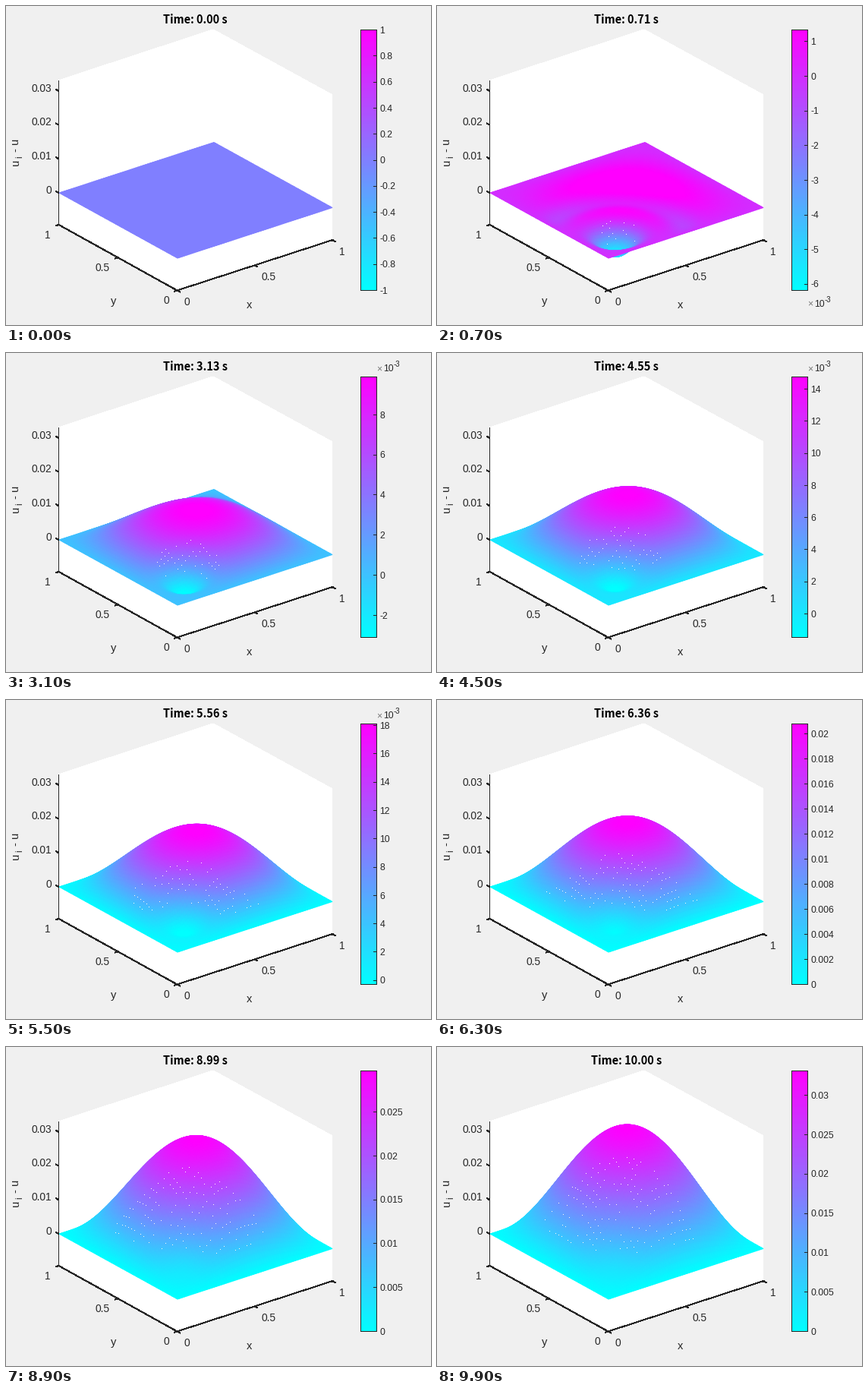
A matplotlib script that plays this animation: 560x420 px, repeating every 10000 ms.

```python
import numpy as np
import matplotlib
import matplotlib.pyplot as plt
from matplotlib.animation import FuncAnimation

W, H, DPI = 560, 420, 100
FRAMES, T_END = 100, 10.0
INK = "#262626"
Z_PX = 4.47                      # pixels per 1e-3 of height
BAR = (467, 488, 31, 374)        # border pixels: left, right, top, bottom

matplotlib.rcParams["font.family"] = "Liberation Sans"

fig = plt.figure(figsize=(W / DPI, H / DPI), dpi=DPI, facecolor="#f0f0f0")
ax = fig.add_axes([0, 0, 1, 1])
ax.axis("off")


def project(x, y, z=0.0):
    """Unit square plus height (in 1e-3) to stage pixels."""
    return 226 + 204 * x - 156 * y, 332 - 66.5 * x - 86 * y - Z_PX * z


def label(x, y, text, px=13.8, **kw):
    kw = {"color": INK, "va": "baseline", "zorder": 6, **kw}
    return ax.text(x, y, text, fontsize=px * 72 / DPI, **kw)


def line(xs, ys):
    # Upright and level lines snap to whole pixels, slanted ones do not.
    return ax.plot(xs, ys, color=INK, lw=0.72, zorder=4, antialiased=False,
                   solid_capstyle="butt")[0]


def grid(n):
    # Ordered from the far corner to the near one, so near cells paint last.
    s = np.linspace(1, 0, n)
    return np.meshgrid(s, s)


def limits(t):
    if t == 0:
        return -1000.0, 1000.0
    lo = np.interp(t, [0, 0.2, 0.4, 0.707, 1.818, 4.545, 5.8],
                   [0, -6, -9.4, -6.18, -4.62, -1.47, 0])
    hi = np.interp(t, [0, 0.707, 1.818, 4.545, 6.364, 7.879, 10],
                   [0, 1.335, 5.36, 14.76, 20.8, 25.94, 33.1])
    return lo, hi


def height(x, y, t):
    """Growing dome, a dip near the front corner and an outgoing ring."""
    if t == 0:
        return np.zeros_like(x)
    base = np.sin(np.pi * x) * np.sin(np.pi * y)
    dome = 3.35 * t - 0.45 * (1 - np.exp(-t))
    # The dome settles with fuller shoulders, leaning to the far corner.
    lean = (1 - np.exp(-(t / 2.5) ** 2)) * (2 * (1 - base) + 3 * (x + y - 1))
    dip = np.interp(t, [0, 0.2, 0.4, 0.707, 1.818, 4.545, 10],
                    [0, 6.1, 9.7, 6.95, 6.6, 6.5, 4.8])
    ring = 1.5 / np.sqrt(max(t, 0.5)) * min(t / 0.6, 1) * np.exp(-t / 4)
    r = np.hypot(x - 0.2, y - 0.2)
    edge = np.tanh(12 * x * (1 - x)) * np.tanh(12 * y * (1 - y)) / 0.918
    wave = (dip * np.exp(-r**2 / (2 * 0.09**2))
            + ring * np.exp(-((r - 0.52 * t) / 0.1) ** 2))
    return (dome + lean) * base - edge * wave


def nice_step(span):
    base = 10.0 ** np.floor(np.log10(span / 11))
    return next(m * base for m in (1, 2, 5, 10) if span / (m * base) <= 11)


def build_axes():
    ax.fill([69, 273, 430, 430, 225.5, 69], [98, 31, 117, 308, 374.5, 288],
            color="white", lw=0, antialiased=False, zorder=1)
    line([69, 69], [98, 288])
    line([69.5, 225.5], [288, 374.5])
    line([225.5, 430.5], [374.5, 308])
    for k, text in enumerate(["0", "0.01", "0.02", "0.03"]):
        y = 246 - 10 * Z_PX * k
        line([65.5, 69.5], [y - 2.2, y])
        label(60.5, y + 0.7, text, ha="right")
    for v, text in ((0, "0"), (0.5, "0.5"), (1, "1")):
        x, y = 225.5 - 156 * v, 374.5 - 86.5 * v
        line([x - 4, x], [y + 1.4, y])
        label(x - 10.5, y + 17.5, text, ha="right")
        x, y = 225.5 + 204.5 * v, 374.5 - 66.5 * v
        line([x, x + 4], [y, y + 2.2])
        label(x + 9, y + 19.5, text)
    label(321, 398, "x", 14.67, ha="center")
    label(141.5, 393, "y", 14.67, ha="center")
    up = dict(rotation=90, rotation_mode="anchor")
    label(17, 209.5, "u", 14.67, **up)
    label(21.5, 200.5, "i", 11.7, **up)
    label(17, 192.5, "- u", 14.67, **up)

    left, right, top, bottom = BAR
    ax.imshow(np.linspace(1, 0, 256)[:, None], cmap="cool", aspect="auto",
              extent=(left, right + 1, bottom + 1, top), origin="upper",
              interpolation="nearest", zorder=2)
    line([left, right, right, left, left], [top, top, bottom, bottom, top])


build_axes()
ax.set_xlim(0, W)
ax.set_ylim(H, 0)

title = label(249.7, 23, "", 14.6, ha="center", weight="bold", color="black",
              family=["Noto Sans CJK JP", "Liberation Sans"])
GX, GY = grid(64)
PX, PY = grid(41)
live = []


def draw_bar_ticks(lo, hi):
    _, right, top, bottom = BAR
    small = hi < 20
    step = nice_step(hi - lo)
    first = int(np.ceil(lo / step - 1e-6))
    last = int(np.floor(hi / step + 1e-6))
    for k in range(first, last + 1):
        v = k * step
        y = bottom - (v - lo) / (hi - lo) * (bottom - top)
        live.append(line([right - 4, right], [y, y]))
        text = f"{round(v if small else v / 1000, 6):g}"
        live.append(label(492.5, y + 4.7, text, 12.2))
    if small:
        y = 24 if hi > -lo else 395.5
        live.append(label(488.5, y, "×", 12.2, color="#777777"))
        live.append(label(497, y, "10", 12.2))
        live.append(label(510.5, y - 6, "-3", 9.8))


def draw_specks(t, lo, hi):
    """Pinholes at mesh nodes on slopes that face the viewer."""
    e = 0.01
    slope = height(PX + e, PY + e, t) - height(PX - e, PY - e, t)
    z = height(PX, PY, t)
    sx, sy = project(PX, PY, z)
    hit = ((slope > 0.45 * slope.max()) & (z > lo + 0.22 * (hi - lo))
           & (sy % 1 < 0.5))
    live.extend(ax.plot(np.floor(sx[hit]) + 0.5, np.floor(sy[hit]) + 0.5,
                        ",", color="#fffaf0", zorder=5))


def draw(i):
    while live:
        live.pop().remove()
    t = i * T_END / (FRAMES - 1)
    lo, hi = limits(t)
    z = height(GX, GY, t)
    sx, sy = project(GX, GY, z)
    live.append(ax.pcolormesh(sx, sy, z, shading="gouraud", cmap="cool",
                              vmin=lo, vmax=hi, zorder=3))
    if t > 0:
        draw_specks(t, lo, hi)
    draw_bar_ticks(lo, hi)
    title.set_text(f"Time: {t:.2f} s")
    return [title, *live]


anim = FuncAnimation(fig, draw, frames=FRAMES, interval=100, repeat=True,
                     repeat_delay=0, blit=False)
plt.show()
```
